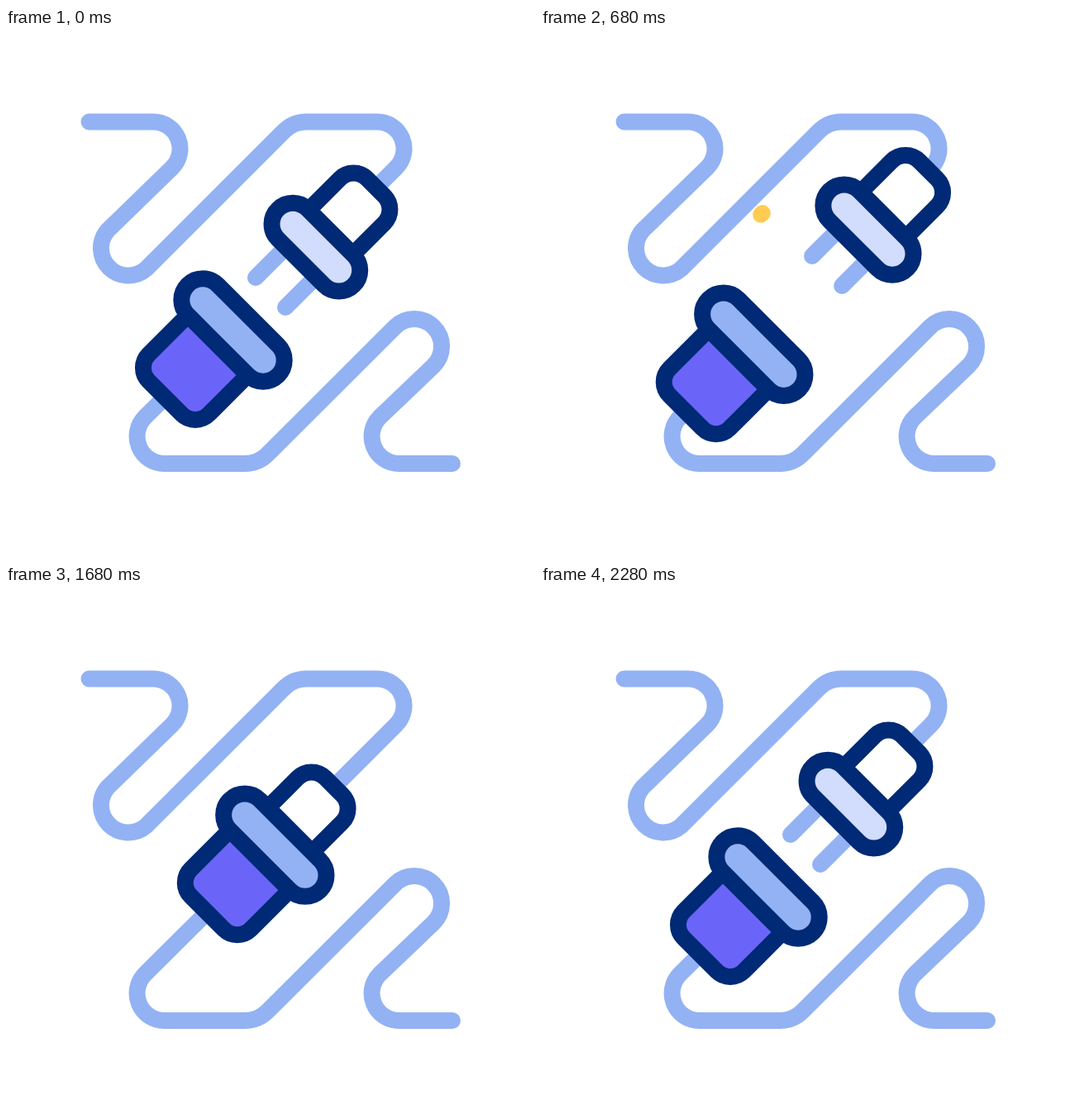
An HTML page for the animation above (2400 ms loop, 640x640 px).

```html
<!DOCTYPE html>
<html lang="en">
<head>
<meta charset="utf-8">
<title>Plug and socket</title>
<style>
  html, body { margin: 0; width: 100%; height: 100%; overflow: hidden; background: #fff; }
  svg { display: block; width: 100%; height: 100%; }
  path, line { fill: none; stroke-width: 20; stroke-linecap: round; stroke-linejoin: round; }
  .blue { stroke: #93b2f4; }
  .yellow { stroke: #ffcb52; }
  rect { stroke: #002a75; stroke-width: 20; }
</style>
</head>
<body>
<svg viewBox="0 0 640 640">
  <path class="blue" id="plugCable"/>
  <path class="blue" id="socketCable"/>
  <!-- x runs up and to the right along the plug axis -->
  <g transform="translate(320 320) rotate(-45)">
    <g id="sparks"></g>
    <g id="plug">
      <line class="blue" id="pinA" x2="78" y1="-25.5" y2="-25.5"/>
      <line class="blue" id="pinB" x2="78" y1="25.5" y2="25.5"/>
      <rect id="plugBody" x="78" width="102" rx="23.5" fill="#fff"/>
      <rect id="plugFlange" x="52.1" width="51" rx="25.5" fill="#d2dcfc"/>
    </g>
    <g id="socket">
      <rect x="-180" y="-51.3" width="116" height="102.6" rx="23" fill="#6a65f8"/>
      <rect x="-90" y="-77.3" width="51.4" height="154.6" rx="25.7" fill="#93b2f4"/>
    </g>
  </g>
</svg>
<script>
const LOOP = 2400;
const el = id => document.getElementById(id);
const set = (node, attrs) => { for (const k in attrs) node.setAttribute(k, attrs[k]); };
const mix = (a, b, k) => a + (b - a) * k;
const span = (t, a, b) => Math.min(1, Math.max(0, (t - a) / (b - a)));

// Timing curve with control points (x1, 0) and (x2, 1)
function ease(x, x1, x2) {
  let lo = 0, hi = 1;
  for (let i = 0; i < 24; i++) {
    const s = (lo + hi) / 2, r = 1 - s;
    if (3 * r * r * s * x1 + 3 * r * s * s * x2 + s * s * s < x) lo = s; else hi = s;
  }
  return lo * lo * (3 - 2 * lo);
}

const sparks = [
  { y: -104.7, from: 31, to: -41, start: 660, full: 850, end: 1000 },
  { y: -151, from: 32, to: -7, start: 690, full: 850, end: 980 },
  { y: 111, from: -29.7, to: 41, start: 1740, full: 1990, end: 2200 },
  { y: 160, from: -32.5, to: 7, start: 1780, full: 1990, end: 2170 }
].map(s => {
  const node = document.createElementNS("http://www.w3.org/2000/svg", "line");
  set(node, { class: "yellow", y1: s.y, y2: s.y });
  el("sparks").append(node);
  return { ...s, node };
});

// Diagonal offset in stage pixels: apart, drawn back, joined, apart again
function offset(t, back, joined) {
  if (t < 633) return mix(0, back, ease(span(t, 125, 633), .33, .1));
  if (t < 1660) return mix(back, joined, ease(span(t, 633, 1020), .33, .67));
  return mix(joined, 0, ease(span(t, 1660, 2280), .333, .5));
}

function draw(t) {
  const p = offset(t, 24.3, -51);
  const s = offset(t, -20.3, 51);
  const squash = Math.sin(Math.PI * span(t, 600, 880));

  set(el("plug"), { transform: `translate(${p * Math.SQRT2} 0)` });
  set(el("socket"), { transform: `translate(${s * Math.SQRT2} 0)` });
  for (const id of ["pinA", "pinB"]) set(el(id), { x1: 9 * squash });
  const body = 38 + squash, flange = 64.9 + 2.2 * squash;
  set(el("plugBody"), { y: -body, height: 2 * body });
  set(el("plugFlange"), { y: -flange, height: 2 * flange });

  set(el("plugCable"), { d: `M100.5 113.5H178A32.5 32.5 0 0 1 201 169L122.7 245.2
    A33 33 0 0 0 169.3 291.6L336.4 124.7Q347.6 113.5 363.5 113.5H449
    A32.5 32.5 0 0 1 472 169L${422.5 + p} ${218.5 - p}` });
  set(el("socketCable"), { d: `M${228 + s} ${411.5 - s}L168.2 470.7
    A33 33 0 0 0 191.5 527H289Q305 527 316.3 515.7L470.7 361.7
    A33 33 0 0 1 517.3 408.6L452.2 470.7A33 33 0 0 0 475.5 527H540` });

  for (const k of sparks) {
    const head = ease(span(t, k.start, k.full), .33, .67);
    const tail = ease(span(t, k.full, k.end), .33, .67);
    set(k.node, {
      x1: mix(k.from, k.to, tail),
      x2: mix(k.from, k.to, head),
      visibility: t > k.start && t < k.end ? "visible" : "hidden"
    });
  }
}

function tick() {
  draw(performance.now() % LOOP);
  requestAnimationFrame(tick);
}
tick();
</script>
</body>
</html>
```
